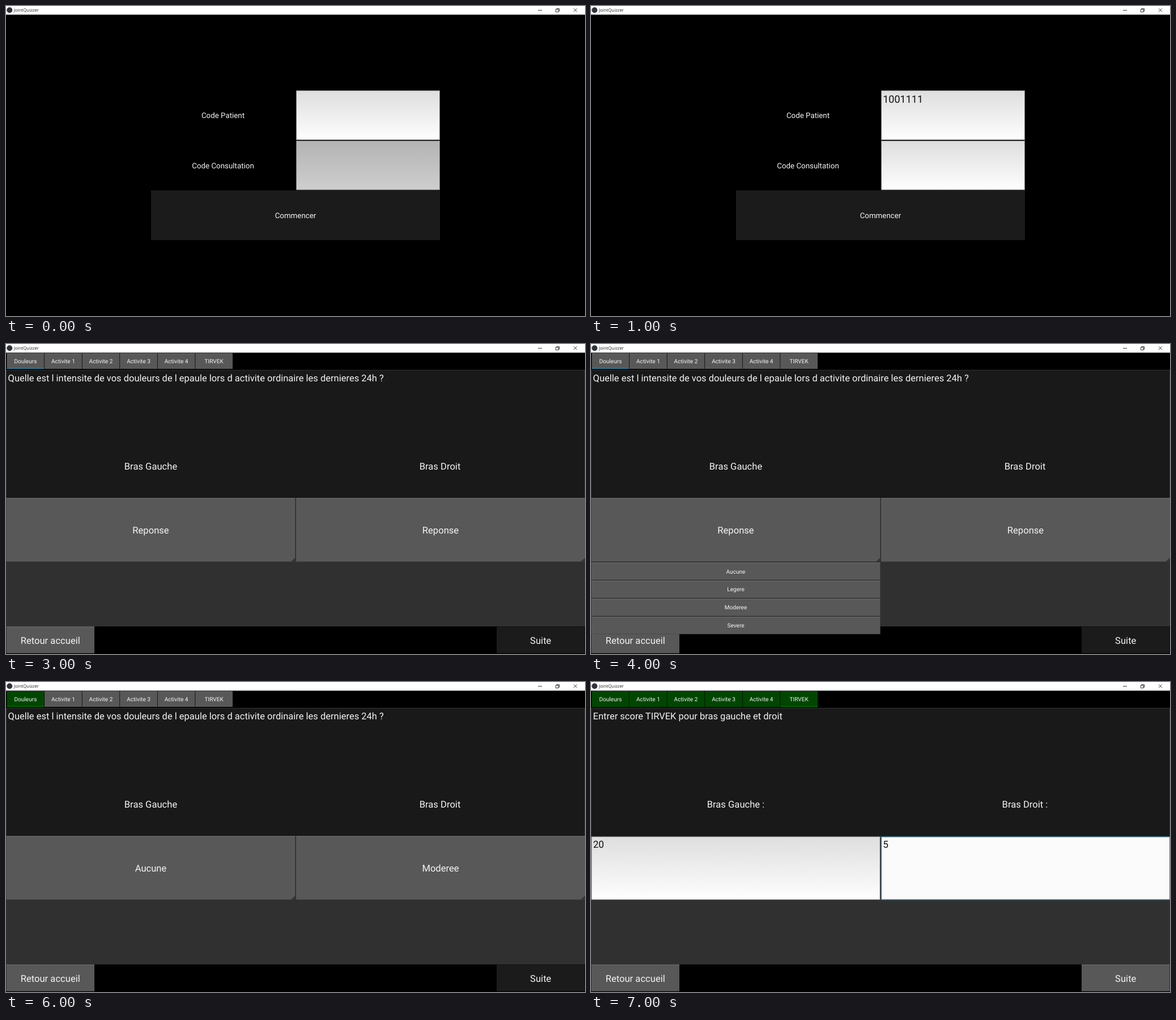
Animation of 1022 by 548 pixels, one loop 8 s. Source, as an HTML page:

```html
<!DOCTYPE html>
<html lang="fr">
<head>
<meta charset="utf-8">
<title>JointQuizzer</title>
<style>
  html, body { margin: 0; width: 100%; height: 100%; overflow: hidden; background: #000; }
  svg { display: block; width: 100%; height: 100%; }
  text { font-family: Roboto, sans-serif; fill: #f4f4f4; text-rendering: geometricPrecision; }
  .caption { font-family: "Open Sans", sans-serif; fill: #222; }
  .entry { fill: #101010; }
</style>
</head>
<body>
<svg id="stage" viewBox="0 0 1022 548" preserveAspectRatio="none">
  <defs>
    <linearGradient id="light" x2="0" y2="1">
      <stop stop-color="#dedede"/><stop offset="1" stop-color="#fefefe"/>
    </linearGradient>
    <linearGradient id="grey" x2="0" y2="1">
      <stop stop-color="#b3b3b3"/><stop offset="1" stop-color="#cecece"/>
    </linearGradient>
  </defs>
  <rect width="1022" height="548"/>
  <g id="screen"></g>
  <rect width="1022" height="15.3" fill="#fff"/>
  <circle cx="6.3" cy="7.3" r="5" fill="#30343a"/>
  <text class="caption" x="14" y="10.4" font-size="7.8">JointQuizzer</text>
  <g fill="none" stroke="#222" stroke-width=".9">
    <path d="M939 7.5h7"/>
    <path d="M970.4 6h4.8v4.6h-4.8zM971.8 6V4.6h4.8v4.6h-1.4"/>
    <path d="M1002 4.4l6 6m0-6l-6 6"/>
  </g>
</svg>
<script>
const NORMAL = '#585858', DISABLED = '#1b1b1b', GREEN = '#004600';
const TABS = ['Douleurs', 'Activite 1', 'Activite 2', 'Activite 3', 'Activite 4', 'TIRVEK'];
const CHOICES = ['Aucune', 'Legere', 'Moderee', 'Severe'];
const LEFT = 0.5, RIGHT = 512, HALF = 510;

const rect = (x, y, w, h, fill, extra = '') =>
  `<rect x="${x}" y="${y}" width="${w}" height="${h}" fill="${fill}" ${extra}/>`;

const label = (str, x, y, size, anchor = 'middle', cls = '') =>
  `<text x="${x}" y="${y}" font-size="${size}" text-anchor="${anchor}" class="${cls}">${str}</text>`;

function button(str, x, y, w, h, size, base, on = true) {
  return rect(x, y, w, h, on ? NORMAL : DISABLED) +
    (on ? rect(x, y, w, 1, '#727272') : '') +
    label(str, x + w / 2, base, size);
}

function input(str, x, y, w, h, size, fill = 'url(#light)', edge = '#777') {
  return rect(x + .4, y + .4, w - .8, h - .8, fill, `stroke="${edge}" stroke-width=".8"`) +
    label(str, x + 3.2, y + (size > 17.5 ? 21.3 : 19.8), size, 'start', 'entry');
}

function login({ patient = '', visit = '', field2 = true, ready = false }) {
  return label('Code Patient', 383, 197.6, 13.35) +
    label('Code Consultation', 383, 286.7, 13.35) +
    input(patient, 512, 149.3, 254, 87.7, 18) +
    input(visit, 512, 238, 254, 87.4, 18, field2 ? 'url(#light)' : 'url(#grey)') +
    button('Commencer', 256, 326, 510, 87.7, 13.35, 375, ready);
}

function tabs(active, done) {
  return TABS.map((name, i) => {
    const x = 1.5 + i * 66.55, green = i < done;
    const line = i === active ? (green ? '#008a08' : '#3197c4') : (green ? '#005400' : '#626262');
    return rect(x, 16.5, 65.8, 27, green ? GREEN : NORMAL) +
      rect(x, 16.5, 65.8, .8, green ? '#005a00' : '#6c6c6c') +
      rect(x, 42.6, 65.8, 1.1, line) +
      label(name, x + 32.9, 33.5, 10.1);
  }).join('');
}

function page(question, active, done, arms, ready, body) {
  return tabs(active, done) +
    rect(0, 45.7, 1022, 453.6, '#303030') +
    rect(1, 46.8, 1020, 225.4, '#191919') +
    label(question, 3.6, 66.2, 16.5, 'start') +
    label(arms[0], 255.5, 222.3, 16.6) +
    label(arms[1], 766, 222.3, 16.6) +
    button('Retour accueil', .5, 499.5, 155.5, 47.2, 16.6, 530, true) +
    button('Suite', 866, 499.5, 155.5, 47.2, 16.6, 530, ready) +
    body;
}

function spinner(str, x) {
  const r = x + HALF;
  return button(str, x, 272.4, HALF, 112.3, 16.6, 335.3) +
    `<path d="M${r} 377.7v7h-7.5z" fill="#343434"/>`;
}

const menu = x => rect(x, 385.5, HALF, 127.5, '#1c1c1c') +
  CHOICES.map((c, i) => button(c, x, 386.3 + i * 31.9, HALF, 30.8, 10.1, 405.5 + i * 31.9)).join('');

const pain = ({ left = 'Reponse', right = 'Reponse', open = null, done = 0 }) => page(
  'Quelle est l intensite de vos douleurs de l epaule lors d activite ordinaire les dernieres 24h ?',
  0, done, ['Bras Gauche', 'Bras Droit'], false,
  rect(510.5, 272.4, 1.5, 112.3, '#2a2a2a') +
  spinner(left, LEFT) + spinner(right, RIGHT) + (open === null ? '' : menu(open)));

const score = () => page(
  'Entrer score TIRVEK pour bras gauche et droit',
  5, 6, ['Bras Gauche :', 'Bras Droit :'], true,
  rect(510.5, 273.2, 1.5, 112, '#222') +
  input('20', LEFT, 273.2, HALF, 112, 17.2) +
  input('5', RIGHT, 273.2, HALF, 112, 17.2, '#fbfbfb') +
  rect(RIGHT + .4, 273.8, HALF - .8, 111, 'none', 'stroke="#2f7d9e" stroke-width="1.2"'));

// One screen per second
const STEP = 1000;
const steps = [
  login({ field2: false }),
  login({ patient: '1001111' }),
  login({ patient: '1001111', visit: '12039764', ready: true }),
  pain({}),
  pain({ open: LEFT }),
  pain({ left: 'Aucune', open: RIGHT }),
  pain({ left: 'Aucune', right: 'Moderee', done: 1 }),
  score()
];

const screenEl = document.getElementById('screen');
const start = performance.now();
let shown = -1;

function draw(now) {
  const i = Math.floor(Math.max(0, now - start) / STEP) % steps.length;
  if (i !== shown) {
    screenEl.innerHTML = steps[i];
    shown = i;
  }
  requestAnimationFrame(draw);
}
draw(start);
</script>
</body>
</html>
```
